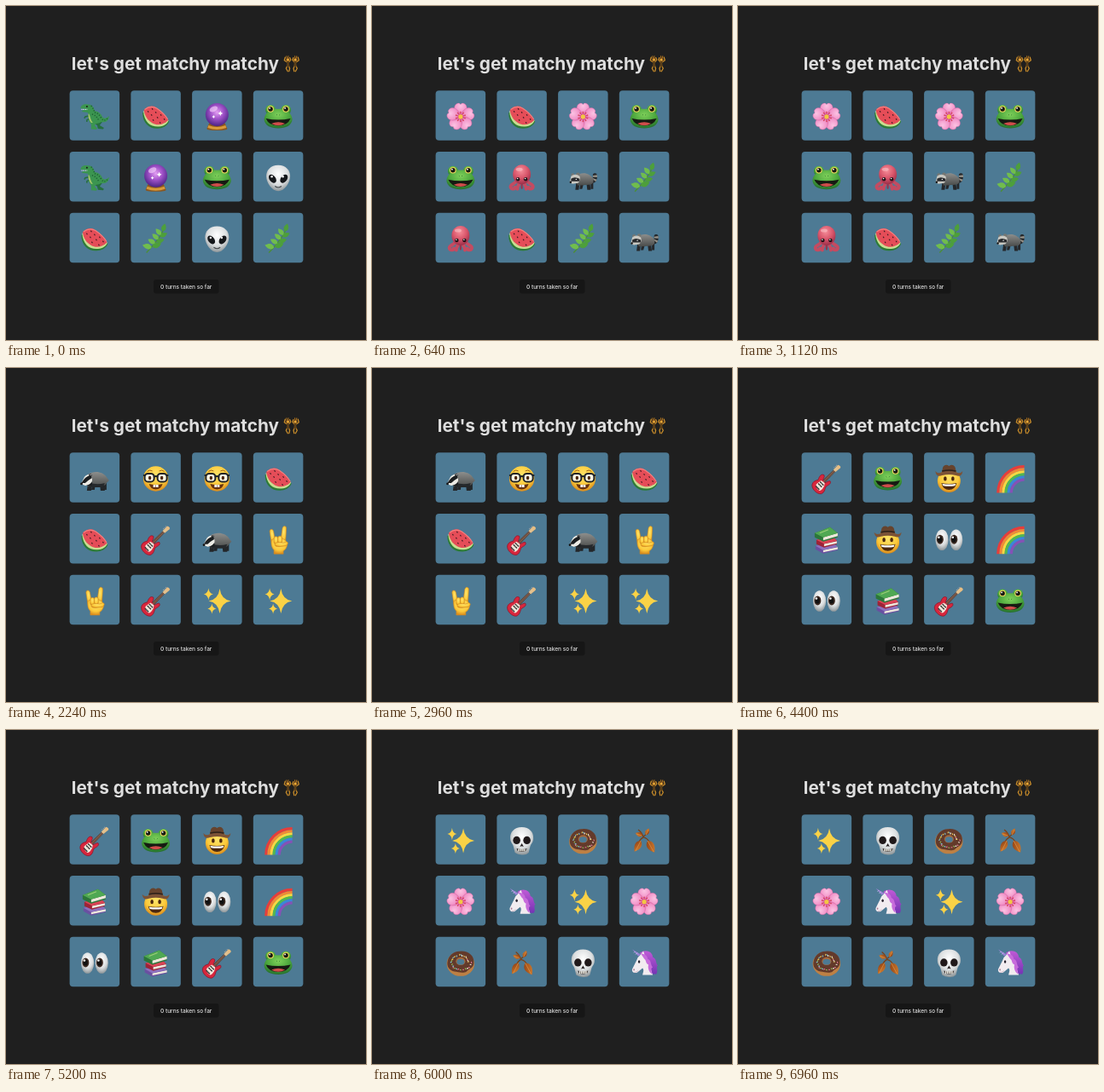
Recreate the animation shown at these times as an HTML page. Size 422 by 392 pixels, loop 7040 ms.

```html
<!DOCTYPE html>
<html lang="en">
<head>
<meta charset="utf-8">
<title>Memory game</title>
<style>
  html, body { margin: 0; width: 100%; height: 100%; overflow: hidden; background: #1f1f1f; }
  svg { display: block; width: 422px; height: 392px; }
  text { font-family: Inter, sans-serif; font-optical-sizing: none; text-anchor: middle; }
  .title { font-size: 20.75px; font-weight: 700; fill: #dedede; }
  .turns { font-size: 6.5px; font-weight: 500; fill: #dedede; }
  .board { opacity: 0; animation: 7040ms step-end infinite; }
  .board:nth-child(1) { animation-name: deal1; }
  .board:nth-child(2) { animation-name: deal2; }
  .board:nth-child(3) { animation-name: deal3; }
  .board:nth-child(4) { animation-name: deal4; }
  .board:nth-child(5) { animation-name: deal5; }
  @keyframes deal1 { 0% { opacity: 1 } 5.68%, 100% { opacity: 0 } }
  @keyframes deal2 { 0% { opacity: 0 } 5.68% { opacity: 1 } 29.54%, 100% { opacity: 0 } }
  @keyframes deal3 { 0% { opacity: 0 } 29.54% { opacity: 1 } 53.4%, 100% { opacity: 0 } }
  @keyframes deal4 { 0% { opacity: 0 } 53.4% { opacity: 1 } 77.27%, 100% { opacity: 0 } }
  @keyframes deal5 { 0% { opacity: 0 } 77.27%, 100% { opacity: 1 } }
</style>
</head>
<body>
<svg viewBox="0 0 422 392">
  <defs>
    <radialGradient id="gold" cx=".5" cy=".35" r=".65"><stop stop-color="#ffe469"/><stop offset=".65" stop-color="#fbc93a"/><stop offset="1" stop-color="#d98a1c"/></radialGradient>
    <radialGradient id="violet" cx=".5" cy=".4" r=".6"><stop stop-color="#e3a0f2"/><stop offset=".45" stop-color="#a455cb"/><stop offset="1" stop-color="#4c2386"/></radialGradient>
    <radialGradient id="green" cx=".5" cy=".3" r=".7"><stop stop-color="#7fd05a"/><stop offset=".6" stop-color="#4aa53c"/><stop offset="1" stop-color="#25702d"/></radialGradient>
    <radialGradient id="bone" cx=".5" cy=".35" r=".65"><stop stop-color="#fff"/><stop offset=".6" stop-color="#dcdfe0"/><stop offset="1" stop-color="#8e9699"/></radialGradient>
    <radialGradient id="coral" cx=".45" cy=".3" r=".7"><stop stop-color="#f58d99"/><stop offset=".55" stop-color="#d9566b"/><stop offset="1" stop-color="#9c2f49"/></radialGradient>
    <radialGradient id="pink" cx=".5" cy=".2" r=".8"><stop stop-color="#fbc3e3"/><stop offset=".6" stop-color="#f295c9"/><stop offset="1" stop-color="#d9559b"/></radialGradient>
    <linearGradient id="fur" x2="0" y2="1"><stop stop-color="#8d8e8c"/><stop offset="1" stop-color="#484a49"/></linearGradient>
    <linearGradient id="rust" x2="1" y2="1"><stop stop-color="#d88432"/><stop offset="1" stop-color="#8c3c12"/></linearGradient>
    <linearGradient id="mane" x2="0" y2="1"><stop stop-color="#c05ad6"/><stop offset="1" stop-color="#7434b4"/></linearGradient>
    <path id="leaf" d="M0 0C-4-2-4.5-6 0-11C4.5-6 4-2 0 0Z"/>
    <path id="star" d="M0-1Q.13-.13 1 0Q.13.13 0 1Q-.13.13-1 0Q-.13-.13 0-1Z"/>

    <g id="trex">
      <path fill="#256f3e" d="M3 4L9 6L6 10L11 13L10 14.5L4 14L3 10L-2 7Z"/>
      <path fill="#3b9550" d="M-16.5-10C-16-14-12-15.5-8-14.5C-4-15-1-12 0-7C5-6 8-3 9 0C11 3 14 2 17-1C17 4 13 7.5 8 6C6 7 4 8 2 8L0 10L3 13.5L2 15L-4 14.5L-4 9C-7 6-8 2-7-2L-8-5L-15-6L-14-7.5L-8-8.5Z"/>
      <path fill="none" stroke="#256f3e" stroke-width="1.5" d="M-7-1L-11 0L-12 2M-5 2L-9 4L-9 6"/>
      <path fill="#a6c76a" d="M-7-4C-5-2-5 4-2 7L-4 7C-7 3-8 0-7-4Z"/>
      <path stroke="#eee" stroke-width="1" stroke-dasharray="1 .6" d="M-15.5-8.6L-8.5-8.6"/>
      <circle cx="-9" cy="-12" r="1" fill="#171b15"/>
      <path stroke="#1f6035" stroke-width="1.5" stroke-dasharray="1.2 1.8" fill="none" d="M-4-13Q-1-9 0-5Q5-4 8 2Q11 6 15 2M-3-3Q3-1 5 5"/>
    </g>
    <g id="melon">
      <path fill="#2c7c36" d="M-15.5-5C-15.5 10-5 15 4 13.5C10 13 15 9 15.5 5Z"/>
      <path fill="#c9dd91" d="M-14.5-7C-14 7-5 12.5 4 11.5C10 11 14 8 15 4Z"/>
      <path fill="#e54d58" d="M-14-8C-10-12.5-4-13.5 0-11C6-7 12-2 14.5 4C10 9 2 11 -4 7.5C-10 4-13-1-14-8Z"/>
      <path fill="none" stroke="#f47f7d" stroke-width="1.2" d="M-13-8.5Q-6-14 1-10Q10-4 14 3"/>
      <g id="seeds" fill="#39191f"></g>
    </g>
    <g id="ball">
      <path fill="#8b5720" d="M-9 7H9L12 14Q12 16 0 16T-12 14Z"/>
      <path fill="#d99a39" d="M-10 10Q0 14 10 10L11 13Q0 17-11 13Z"/>
      <circle cy="-2.5" r="13.5" fill="url(#violet)"/>
      <ellipse cx="-4" cy="-9" rx="5" ry="3" fill="#f5cffa" opacity=".65" transform="rotate(-25 -4 -9)"/>
      <g fill="#fff"><use href="#star" transform="translate(4 -4) scale(3)"/><use href="#star" transform="translate(-4 0) scale(2)"/></g>
    </g>
    <g id="frog">
      <g fill="url(#green)"><circle cx="-9" cy="-8" r="6"/><circle cx="9" cy="-8" r="6"/><path d="M0-9C10-10 16-3 16.5 3C16 10 9 13.5 0 13.5S-16 10-16.5 3C-16-3-10-10 0-9Z"/></g>
      <g fill="#f2d85c"><circle cx="-9" cy="-9" r="3.8"/><circle cx="9" cy="-9" r="3.8"/></g>
      <g fill="#161a12"><circle cx="-9" cy="-9" r="2.7"/><circle cx="9" cy="-9" r="2.7"/><path d="M-14.5 2Q0 5 14.5 2Q11 10.5 0 10.5T-14.5 2Z"/></g>
      <path fill="#cf4d4a" d="M-8 8Q0 4.5 8 8Q4 10.3 0 10.3T-8 8Z"/>
      <g fill="#fff"><circle cx="-10" cy="-10" r=".9"/><circle cx="8" cy="-10" r=".9"/></g>
      <path fill="none" stroke="#246528" stroke-width=".9" d="M-2-2.5l.8.6M2-2.5l-.8.6"/>
    </g>
    <g id="alien">
      <path fill="url(#bone)" d="M0-15C9-15 14-9 14-2C14 6 7 15.5 0 15.5S-14 6-14-2C-14-9-9-15 0-15Z"/>
      <g fill="#15171a"><ellipse cx="-6.7" cy="1" rx="3.6" ry="5.6" transform="rotate(-38 -6.7 1)"/><ellipse cx="6.7" cy="1" rx="3.6" ry="5.6" transform="rotate(38 6.7 1)"/></g>
      <g fill="#fff"><circle cx="-7.5" cy="-1.5" r="1.2"/><circle cx="5.5" cy="-1.5" r="1.2"/></g>
      <path fill="none" stroke="#44484a" stroke-width="1.1" stroke-linecap="round" d="M-3.5 10Q0 12.5 3.5 10"/>
    </g>
    <g id="herb">
      <path fill="none" stroke="#4b8f36" stroke-width="1.4" d="M-11 16Q-4 9 2 1T9-12"/>
      <g id="sprig"></g>
    </g>
    <g id="blossom"><g id="petals"></g><g id="stamens"></g><circle r="2.6" fill="#f2c744"/></g>
    <g id="octopus">
      <g fill="none" stroke="#c44b61" stroke-width="4" stroke-linecap="round"><path d="M-6 3C-8 8-14 7-13 11C-12 14-8 13-8 11M6 3C8 8 14 7 13 11C12 14 8 13 8 11M-3 5C-3 10-6 10-5 13M3 5C3 10 6 10 5 13"/><path stroke="#9c2f49" stroke-width="2" d="M0 6V12"/></g>
      <ellipse cy="-4" rx="10.5" ry="11.5" fill="url(#coral)"/>
      <g fill="#241319"><circle cx="-4.5" cy="1.5" r="2.2"/><circle cx="4.5" cy="1.5" r="2.2"/></g>
      <g fill="#fff"><circle cx="-5" cy=".8" r=".8"/><circle cx="4" cy=".8" r=".8"/></g>
      <ellipse cx="-3" cy="-10" rx="4" ry="2" fill="#fac1c7" opacity=".6"/>
    </g>
    <g id="raccoon">
      <g fill="none" stroke-width="5" stroke-linecap="round"><path stroke="#24272a" d="M9 4Q15 4 14-3"/><path stroke="#969289" stroke-linecap="butt" stroke-dasharray="2 2" d="M9 4Q15 4 14-3"/></g>
      <path fill="#25272a" d="M-8 6H-4L-5 14H-9ZM-3 6H1L-1 13H-4ZM4 6H8L9 14H5ZM9 5H12L12 13H9Z"/>
      <path fill="url(#fur)" d="M-8-2C-2-8 8-6 12 1C13 5 11 8 7 8L-6 9Q-10 4-8-2Z"/>
      <g fill="#757773"><circle cx="-12" cy="-3.5" r="2"/><circle cx="-6" cy="-4" r="2.3"/></g>
      <path fill="#c9c8c1" d="M-14-2Q-9-6-4-2Q-2 3-6 6L-12 7Q-16 6-15.5 4Z"/>
      <path fill="#282a2d" d="M-14 1Q-10-2-4 1L-4 4L-9 4L-14 4Z"/>
      <circle cx="-14.5" cy="5" r="1.2" fill="#111"/><circle cx="-8" cy="1.7" r=".7" fill="#fff"/>
    </g>
    <g id="badger">
      <path fill="#232629" d="M-8 6H-3L-4 14H-9ZM-2 6H1L0 13H-4ZM6 5H11L12 14H7ZM11 4H14L14 13H11Z"/>
      <path fill="url(#fur)" d="M-8-5C0-10 10-8 14-2L17 2L14 5Q12 9 7 8L-7 10Q-11 2-8-5Z"/>
      <path fill="#25282b" d="M-7 4Q2 8 12 5L10 10H-7Z"/>
      <path fill="#ecebe5" d="M-16 6L-13 0Q-11-5-6-5Q-2-2-3 4Q-6 8-11 8Z"/>
      <path fill="#1c1f21" d="M-15.5 5Q-11-3-5-4L-3-1Q-8 2-11 5ZM-10 8Q-5 7-3 3L-3 8Z"/>
      <circle cx="-5" cy="-4" r="1.7" fill="#1c1f21"/><path fill="#fff" d="M-6-5L-4-5L-4-4Z"/><circle cx="-15.3" cy="6" r="1.4" fill="#151617"/>
    </g>
    <g id="nerd">
      <circle r="14.7" fill="url(#gold)"/>
      <path fill="#66310f" d="M-8 6Q0 8 8 6Q6 12.5 0 12.5T-8 6Z"/><path fill="#fff" d="M-3 7H3V10H.3V7.3H-.3V10H-3Z"/>
      <g fill="#fff9e5" stroke="#202326" stroke-width="2"><rect x="-13" y="-6" width="11" height="9.5" rx="3.8"/><rect x="2" y="-6" width="11" height="9.5" rx="3.8"/><path d="M-2.5-2Q0-4 2.5-2M-14.7-4H-12M12-4H14.7" fill="none"/></g>
      <g fill="#4b270f"><ellipse cx="-7" cy="-1" rx="1.7" ry="2.3"/><ellipse cx="7" cy="-1" rx="1.7" ry="2.3"/></g>
      <path fill="none" stroke="#9d6319" stroke-width="1" d="M-10-8.5Q-7-11-4-9M4-9Q7-11 10-8.5"/>
    </g>
    <g id="guitar"><g transform="rotate(45)">
      <path fill="#5a3323" d="M-1.4-14H1.4L1.8 8H-1.8Z"/>
      <path fill="#e6bd83" d="M-2-21Q2-23 2.5-20L1.8-13H-1.8Z"/>
      <path fill="#d7273d" stroke="#8d1428" stroke-width=".7" d="M-2 4C-3 2-3 0-5-1C-9 0-8 4-6 8C-8 11-9 14-7 17C-4 21 5 21 8 17C10 13 7 10 6 7C7 3 8 0 5-1C3 0 3 3 2 5Z"/>
      <path fill="#f3e8dc" d="M-3 6L-4 13Q-2 17 4 16Q6 14 4 8L2 5Z"/>
      <path stroke="#333" stroke-width="1.4" d="M-3 8H3M-3 11H3M-3 15H3"/>
      <path stroke="#d7d0c0" stroke-width=".35" d="M-.6-18V15M.6-18V15"/>
      <path stroke="#aaa" stroke-width="1" stroke-dasharray="1 1" d="M-2.7-20V-14"/>
    </g></g>
    <g id="horns">
      <g fill="url(#gold)" stroke="#d08b24" stroke-width=".6">
        <path d="M-8 3L-10-10Q-10-12.5-8-12.5T-5.5-10L-4-2Z"/><path d="M3 0L5-14Q6-16.5 8-16T9.5-13L8.5 3Z"/>
        <path d="M-8 0Q0-5 8 0L11 4Q10 11 6 13V16.5H-5V12Q-9 8-8 0Z"/>
        <rect x="-5" y="-4" width="4.8" height="9" rx="2.3"/><rect x="-.4" y="-4.5" width="4.8" height="9" rx="2.3"/>
        <path d="M10 2Q13 4 9 7L1 8Q-4 8-4 5.5T0 3L6 3.5Z"/>
      </g>
    </g>
    <g id="sparkles" fill="#fad246"><use href="#star" transform="translate(3.2 0) scale(13 14.5)"/><use href="#star" transform="translate(-10 -8) scale(5.5 7)"/><use href="#star" transform="translate(-6 9) scale(5 6)"/></g>
    <g id="cowboy">
      <circle cy="2.5" r="13.5" fill="url(#gold)"/>
      <g fill="#4b270f"><ellipse cx="-4.5" cy="0" rx="1.8" ry="2.6"/><ellipse cx="4.5" cy="0" rx="1.8" ry="2.6"/><path d="M-9 5Q0 7 9 5Q7 13 0 13T-9 5Z"/></g>
      <path fill="#fff" d="M-8 5.8Q0 7.5 8 5.8L7 8.3Q0 9.5-7 8.3Z"/>
      <path fill="#66432d" d="M-9-6L-7-14Q-4-18 0-15Q4-18 7-14L9-6Z"/>
      <path fill="#7b5237" d="M-16-9Q-13-5-8-8Q0-10 8-8Q13-5 16-9Q15-1 8-4Q0-6-8-4Q-15-1-16-9Z"/>
      <path fill="none" stroke="#2d211a" stroke-width="1.6" d="M-8-9Q0-11 8-9"/>
    </g>
    <g id="rainbow"><g id="bands" fill="none" stroke-width="3.2"></g></g>
    <g id="books">
      <path fill="#6950a1" d="M-13 7L6 3L13 9V12L-4 16L-13 11Z"/><path fill="#eee8dc" d="M-4 12L13 8.5V11L-4 14.5Z"/><path fill="#8e70bd" d="M-13 7L6 3L13 8L-4 12Z"/>
      <path fill="#9d2337" d="M-12 0L7-4L12 1V5L-3 9L-12 5Z"/><path fill="#eee8dc" d="M-3 4.7L12 1.5V4L-3 7.5Z"/><path fill="#da4455" d="M-12 0L7-4L12 1L-3 4.5Z"/>
      <path fill="#2b7639" d="M-14-8L4-15L13-8V-3L-4 2L-14-3Z"/><path fill="#eee8dc" d="M-4-3L13-8V-4.5L-4 .5Z"/><path fill="#50a853" d="M-14-8L4-15L13-8L-4-3Z"/>
      <path stroke="#9ccd79" stroke-width="1.1" d="M-8-8L2-12"/>
    </g>
    <g id="eyes">
      <g fill="url(#bone)"><ellipse cx="-8.3" rx="7.6" ry="12.3"/><ellipse cx="8.3" rx="7.6" ry="12.3"/></g>
      <g fill="#3c2a22"><ellipse cx="-10.5" cy="-.5" rx="4" ry="5.5"/><ellipse cx="6" cy="-.5" rx="4" ry="5.5"/></g>
      <g fill="#111"><ellipse cx="-10.7" cy="-.5" rx="2.5" ry="3.5"/><ellipse cx="5.8" cy="-.5" rx="2.5" ry="3.5"/></g>
      <g fill="#fff"><circle cx="-12" cy="-3" r="1.3"/><circle cx="4.5" cy="-3" r="1.3"/></g>
    </g>
    <g id="skull">
      <path fill="url(#bone)" d="M0-16C9-16 14-10 13.5-3C13.5 2 11 3 10 6L8 14Q5 17 0 16.5T-8 14L-10 6C-11 3-13.5 2-13.5-3C-14-10-9-16 0-16Z"/>
      <g fill="#20191a"><ellipse cx="-6" cy="-.5" rx="4.3" ry="4.6"/><ellipse cx="6" cy="-.5" rx="4.3" ry="4.6"/><path d="M0 3L2.2 7L0 6.3L-2.2 7Z"/><path d="M-6 9Q0 11 6 9L5 12Q0 14-5 12Z"/></g>
      <path stroke="#f4f2e8" stroke-width="3" stroke-dasharray="1.5 .6" d="M-4.5 11H4.8"/>
    </g>
    <g id="donut">
      <ellipse cy="1" rx="16.2" ry="14.4" fill="#bd8044"/>
      <path fill="#633a2b" d="M-15-3C-13-11-6-14 1-14C10-14 16-8 15.5-1C16 6 9 7 7 10C2 13-3 10-7 10C-13 9-17 4-15-3Z"/>
      <g id="sprinkles" stroke-width="1.1" stroke-linecap="round"></g>
      <ellipse cy="-2" rx="5.6" ry="4.6" fill="#a6683a"/><ellipse cy="-1.3" rx="4.5" ry="3.4" fill="#4d7a94"/>
    </g>
    <g id="leaves">
      <path fill="none" stroke="#794119" stroke-width="1.3" d="M-7-13Q-2-9-1-4Q4-3 6 2M-1-4Q-5-2-6 2M-1-5L4-9"/>
      <g fill="url(#rust)"><use href="#leaf" transform="translate(-4 0) rotate(210) scale(1.2 1.35)"/><use href="#leaf" transform="translate(4 0) rotate(150) scale(1.35 1.45)"/><use href="#leaf" transform="translate(-2 -6) rotate(-70) scale(.8)"/><use href="#leaf" transform="translate(2 -7) rotate(25) scale(.75)"/></g>
      <path fill="none" stroke="#e6a14d" stroke-width=".6" d="M-4 0L-10 12M4 0L11 13M-3-6L-9-8M2-7L5-13"/>
    </g>
    <g id="unicorn">
      <path fill="url(#mane)" d="M-5-12C2-17 10-13 10-7C15-5 13 0 16 3C13 4 17 10 14 13L4 13L-2-3Z"/>
      <path fill="#f2ecf0" d="M-5-9L-1-14L1-8C5-4 7 5 10 14L-2 14C-1 10 0 8-2 6L-8 11C-12 13-15 10-14 7L-9-3Q-8-7-5-9Z"/>
      <path fill="#c76bdb" d="M-4-11C0-11 4-9 4-5C9-3 7 2 10 5C7 6 9 10 9 13C5 10 4 5 5 2C1 0 3-3 0-5Z"/>
      <path fill="#9a84d5" d="M-7-8L-14-16L-4-10Z"/><path stroke="#d7cef5" stroke-width=".8" d="M-10-10L-8-12M-12-12L-10.5-13.5"/>
      <ellipse cx="-6" cy="-1.5" rx="1.2" ry="1.8" fill="#26202b"/><ellipse cx="-12" cy="8" rx=".8" ry="1.1" fill="#a6738d"/>
      <path fill="none" stroke="#c9afbd" stroke-width=".8" d="M-12 11Q-9 11-7 9"/>
    </g>
    <g id="dancer">
      <path fill="none" stroke="#c98d2b" stroke-width="1.3" stroke-linecap="round" stroke-linejoin="round" d="M-5.5-2L-8.5-4L-7.5-7.5M-3-2L-1-4.5L-2-7M-5 2.5L-6.5 5.5L-4.5 9M-3.5 2.5L-2.2 5.5L-3 9"/>
      <path fill="#5c4019" d="M-6-2.5H-2.5L-3 0L-2.2 3.5H-6L-5.5 0Z"/>
      <circle cx="-4.5" cy="-4.8" r="2.2" fill="#8c571d"/><circle cx="-4.3" cy="-4.5" r="1.4" fill="#e5aa38"/>
      <path stroke="#b47620" stroke-width="1" d="M-5.5-6.3L-6-9.2M-4-6.5L-3.8-9.3"/>
    </g>
  </defs>

  <rect width="422" height="392" fill="#1f1f1f"/>
  <text class="title" x="198.4" y="75">let's get matchy matchy</text>
  <g transform="translate(334.8 67.7)"><use href="#dancer"/><use href="#dancer" transform="scale(-1 1)"/></g>
  <g id="cards" fill="#4d7a94"></g>
  <g id="boards"></g>
  <rect x="173" y="321" width="76.5" height="16.4" rx="3.2" fill="#161616"/>
  <text class="turns" x="211.2" y="331.5">0 turns taken so far</text>
</svg>
<script>
  const fill = (id, html) => { document.getElementById(id).innerHTML = html; };
  const repeat = (n, draw) => Array.from({ length: n }, (_, i) => draw(i)).join('');

  fill('seeds', [[-9, -6], [-4, -9], [-5, -2], [0, -5], [-3, 4], [2, 1], [6, -2], [5, 7], [10, 3]]
    .map(([x, y]) => `<ellipse cx="${x}" cy="${y}" rx=".6" ry="1.1" transform="rotate(-35 ${x} ${y})"/>`).join(''));

  fill('sprig', [[-5, 10, -75], [-4, 9, 70], [-1, 5, -60], [1, 3, 75], [3, 0, -50], [5, -3, 65], [6, -5, -40], [8, -9, 18]]
    .map(([x, y, turn], i) => `<use href="#leaf" fill="${i % 2 ? '#4d9f3b' : '#70bd4d'}" transform="translate(${x} ${y}) rotate(${turn}) scale(${i < 2 ? 1 : .85})"/>`).join(''));

  fill('petals', repeat(5, i => `<path fill="url(#pink)" stroke="#d765a4" stroke-width=".4" transform="rotate(${i * 72})"
    d="M0 0C-8-4-9-12-5-15Q-2-17 0-14.5Q2-17 5-15C9-12 8-4 0 0Z"/>`));
  fill('stamens', repeat(10, i => `<g transform="rotate(${i * 36})"><path stroke="#c72f6e" stroke-width=".8" d="M0 0V-5"/>
    <circle cy="-5.4" r=".9" fill="#d8475c"/></g>`));

  fill('bands', ['#e63e3b', '#f28a35', '#f8d743', '#51b751', '#3a87d8', '#8552b6'].map((color, i) => {
    const r = 30.8 - i * 3.1;
    return `<path stroke="${color}" d="M${16.5 - r} 16.5A${r} ${r} 0 0 1 16.5 ${16.5 - r}"/>`;
  }).join(''));

  const candy = ['#f3d55b', '#e77899', '#7dc9d7', '#f1ece0', '#95c65e'];
  fill('sprinkles', repeat(28, i => {
    const a = i * 2.4, r = .56 + .32 * ((i * .618) % 1);
    const x = Math.cos(a) * r * 15, y = Math.sin(a) * r * 12 - 1.5;
    return `<path stroke="${candy[i % 5]}" d="M${x} ${y}l${Math.cos(i * 2)} ${Math.sin(i * 2)}"/>`;
  }));

  const deals = [
    'trex melon ball frog trex ball frog alien melon herb alien herb',
    'blossom melon blossom frog frog octopus raccoon herb octopus melon herb raccoon',
    'badger nerd nerd melon melon guitar badger horns horns guitar sparkles sparkles',
    'guitar frog cowboy rainbow books cowboy eyes rainbow eyes books guitar frog',
    'sparkles skull donut leaves blossom unicorn sparkles blossom donut leaves skull unicorn'
  ];
  const pitch = 71.75, size = 58.5;
  const cardX = i => 74.6 + i % 4 * pitch;
  const cardY = i => 99.3 + Math.floor(i / 4) * pitch;

  fill('cards', repeat(12, i => `<rect x="${cardX(i)}" y="${cardY(i)}" width="${size}" height="${size}" rx="4"/>`));
  fill('boards', deals.map(deal => `<g class="board">${deal.split(' ').map((name, i) =>
    `<use href="#${name}" transform="translate(${cardX(i) + size / 2} ${cardY(i) + size / 2 + 1.4})"/>`).join('')}</g>`).join(''));
</script>
</body>
</html>
```
